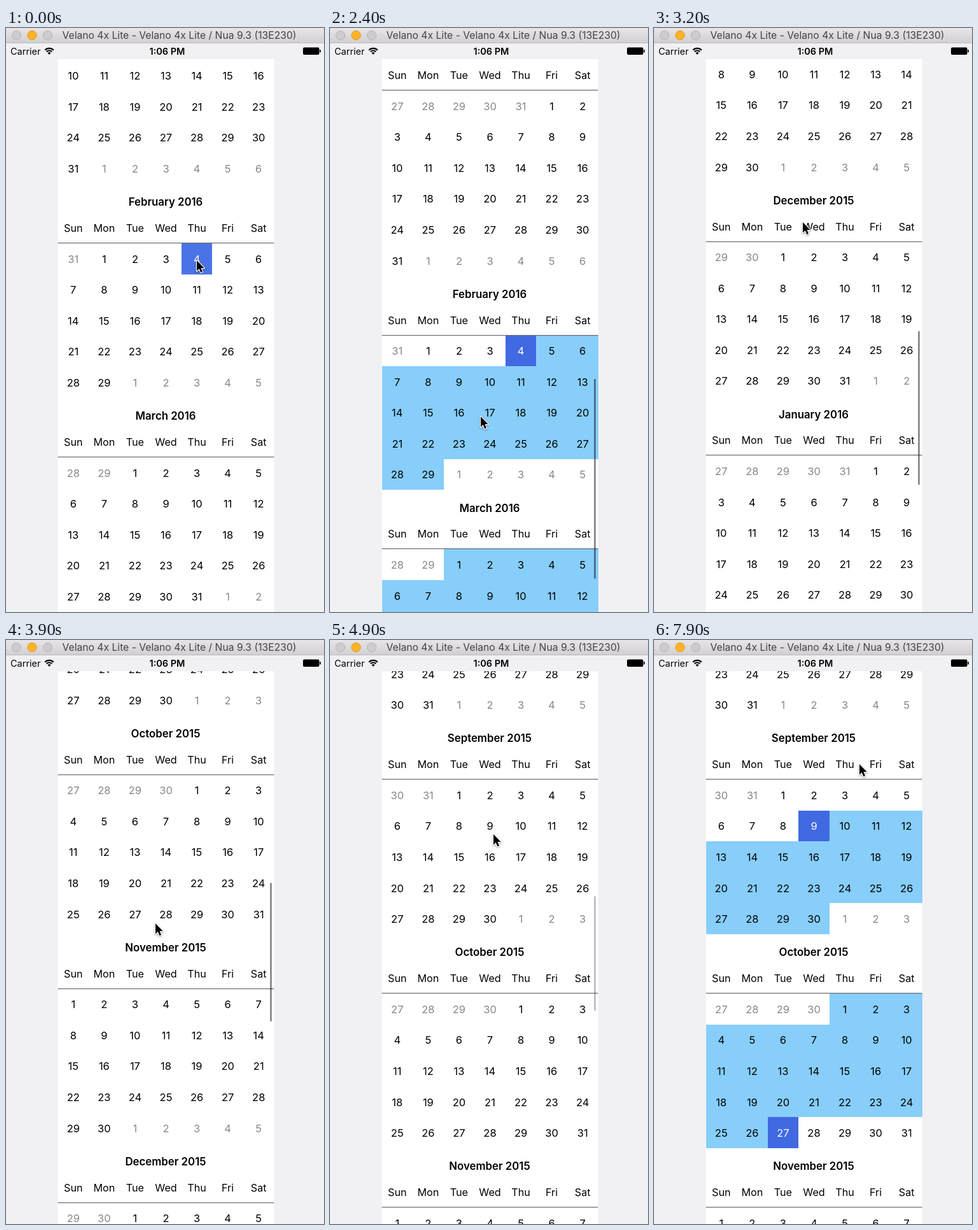
Animation, 500 px wide and 917 px high, one loop 8.1 s. Source, as an HTML page with a canvas:

```html
<!DOCTYPE html>
<html lang="en">
<head>
<meta charset="utf-8">
<title>Calendar range selection</title>
<style>
  html, body { margin: 0; width: 100%; height: 100%; overflow: hidden; background: #f1f0f3; }
  canvas { display: block; }
</style>
</head>
<body>
<canvas id="stage" width="500" height="917"></canvas>
<script>
const ctx = document.getElementById('stage').getContext('2d');
const W = 500, H = 917, LOOP = 8100, STEP = 100;
const LEFT = 81.5, CELL = 340 / 7, TOP = 49, HEAD = 93.1;
const FONT = 'Inter, Roboto, sans-serif';
const DAYS = ['Sun', 'Mon', 'Tue', 'Wed', 'Thu', 'Fri', 'Sat'];
const NAMES = ['January', 'February', 'March', 'April', 'May', 'June', 'July',
  'August', 'September', 'October', 'November', 'December'];
const ROYAL = '#4169e1', ROYAL_FRESH = '#4a73e6', SKY = '#87cefa';

// Months from April 2015 to March 2016; line = y of the rule below the weekdays
const months = [];
let y0 = 0;
for (let i = 3; i < 15; i++) {
  const year = 2015 + Math.floor(i / 12), month = i % 12;
  const first = new Date(year, month, 1).getDay();
  const count = new Date(year, month + 1, 0).getDate();
  const rows = Math.ceil((first + count) / 7);
  months.push({ year, month, first, count, rows, line: y0 + HEAD });
  y0 += HEAD + rows * CELL;
}
const febLine = months[10].line;
for (const m of months) m.line -= febLine;
const END = y0 - febLine;

// [time, distance scrolled]
const SCROLL = [[2000, 0], [2100, 18], [2200, 55], [2300, 97], [2400, 144.5], [2500, 210],
  [2600, 310], [2700, 400], [2900, 560], [3050, 655], [3200, 718], [3300, 750],
  [3400, 800], [3500, 865], [3600, 975], [3700, 1085], [3900, 1266], [4100, 1402],
  [4300, 1510], [4500, 1590], [4600, 1609.5]];

// [time, x, y] of the pointer tip
const POINTER = [[300, 300, 365], [1000, 103, 835], [1300, 103, 835], [2000, 237, 465],
  [2200, 237, 520], [2400, 237, 610], [2500, 237, 640], [3100, 234, 305], [3200, 234, 305],
  [3500, 235, 445], [3900, 235, 445], [4600, 257, 305], [4900, 257, 305], [5500, 252, 290],
  [5700, 252, 290], [6500, 192, 770], [7200, 192, 770], [7600, 323, 195]];

const BAR_ALPHA = [[2000, 0], [2100, 0.5], [4800, 0.5], [4900, 0.28], [5100, 0]];

const linear = k => k;
const smooth = k => k * k * (3 - 2 * k);

function track(keys, t, ease = linear) {
  if (t <= keys[0][0]) return keys[0].slice(1);
  for (let i = 1; i < keys.length; i++) {
    const a = keys[i - 1], b = keys[i];
    if (t <= b[0]) {
      const k = ease((t - a[0]) / (b[0] - a[0]));
      return a.slice(1).map((v, j) => v + (b[j + 1] - v) * k);
    }
  }
  return keys[keys.length - 1].slice(1);
}

const dayKey = (year, month, day) => year * 10000 + month * 100 + day;

function selectionAt(t) {
  if (t < 5700) {
    const from = dayKey(2016, 1, 4);
    return t < 1200
      ? { from, to: from, fresh: t < 100 ? from : 0 }
      : { from, to: dayKey(2016, 2, 20), fresh: 0 };
  }
  const from = dayKey(2015, 8, 9);
  return t < 6600
    ? { from, to: from, fresh: t < 5800 ? from : 0 }
    : { from, to: dayKey(2015, 9, 27), fresh: 0 };
}

function text(str, x, y, size, color = '#000', weight = 400, align = 'center') {
  ctx.font = `${weight} ${size}px ${FONT}`;
  ctx.textAlign = align;
  ctx.fillStyle = color;
  ctx.fillText(str, x, y);
}

function rect(x, y, w, h, color) {
  ctx.fillStyle = color;
  ctx.fillRect(x, y, w, h);
}

function pill(x, y, w, h, r, color) {
  ctx.fillStyle = color;
  ctx.beginPath();
  ctx.roundRect(x, y, w, h, r);
  ctx.fill();
}

function drawMonth(m, line, sel) {
  text(`${NAMES[m.month]} ${m.year}`, 251, line - 58.7, 16.8, '#000', 600);
  DAYS.forEach((d, c) => text(d, LEFT + (c + 0.5) * CELL, line - 18, 16.2));
  const before = new Date(m.year, m.month, 0).getDate();
  for (let i = 0; i < m.rows * 7; i++) {
    const col = i % 7, x = LEFT + col * CELL;
    const y = line + Math.floor(i / 7) * CELL;
    let day = i - m.first + 1, color = '#000';
    if (day < 1 || day > m.count) {
      day = day < 1 ? before + day : day - m.count;
      color = '#88888a';
    } else {
      const key = dayKey(m.year, m.month, day);
      if (key === sel.from || key === sel.to) {
        color = '#fff';
        const x1 = Math.round(x), y1 = Math.round(y);
        rect(x1, y1, Math.round(x + CELL) - x1, Math.round(y + CELL) - y1,
          key === sel.fresh ? ROYAL_FRESH : ROYAL);
      } else if (key > sel.from && key < sel.to) {
        const x1 = Math.round(x), y1 = Math.round(y);
        rect(x1, y1, Math.round(x + CELL) - x1, Math.round(y + CELL) - y1, SKY);
      }
    }
    text(day, x + CELL / 2, y + CELL / 2 + 6.4, 16.5, color);
  }
  rect(LEFT, Math.round(line) - 1, 340, 1.2, '#6c6c6e');
}

function firstVisible(origin) {
  return months.findIndex(m => origin + m.line + m.rows * CELL > TOP);
}

function drawBar(t, origin) {
  const alpha = track(BAR_ALPHA, t)[0];
  if (!alpha) return;
  // Four earlier months stay loaded, one step behind the scroll
  const seen = firstVisible(338 + track(SCROLL, t - STEP)[0]);
  const start = months[Math.max(0, seen - 4)].line - HEAD;
  const view = H - TOP, ratio = view / (END - start);
  const y = TOP + (TOP - origin - start) * ratio;
  pill(415.2, y, 2.6, view * ratio, 1.3, `rgba(0,0,0,${alpha})`);
}

function drawCalendar(t) {
  const origin = 338 + track(SCROLL, t)[0];
  const sel = selectionAt(t);
  ctx.save();
  ctx.beginPath();
  ctx.rect(0, TOP, W, H - TOP);
  ctx.clip();
  rect(LEFT, TOP, 340, H - TOP, '#fff');
  for (const m of months) {
    const line = origin + m.line;
    if (line - HEAD < H && line + m.rows * CELL > TOP) drawMonth(m, line, sel);
  }
  drawBar(t, origin);
  ctx.restore();
}

function drawWindow() {
  const g = ctx.createLinearGradient(0, 0, 0, 24);
  g.addColorStop(0, '#e7e5e7');
  g.addColorStop(1, '#d1cfd1');
  rect(0, 0, W, 24, g);
  rect(0, 23, W, 1, '#bab8ba');
  [['#cdcbcd', '#b7b5b7'], ['#fdb225', '#dd9a2c'], ['#cdcbcd', '#b7b5b7']].forEach(([fill, edge], i) => {
    ctx.beginPath();
    ctx.arc(16.5 + i * 24.5, 11.5, 7.2, 0, 7);
    ctx.fillStyle = fill;
    ctx.fill();
    ctx.strokeStyle = edge;
    ctx.lineWidth = 1;
    ctx.stroke();
  });
  text('Velano 4x Lite - Velano 4x Lite / Nua 9.3 (13E230)', 272.5, 17.3, 15.7, '#454345');
}

function drawStatus() {
  text('Carrier', 7, 42, 14.5, '#000', 400, 'left');
  text('1:06 PM', 253.5, 42, 14.5, '#000', 600);
  ctx.strokeStyle = '#000';
  ctx.lineWidth = 2.1;
  for (const r of [6, 9.6]) {
    ctx.beginPath();
    ctx.arc(68, 41.5, r, -Math.PI * 0.75, -Math.PI * 0.25);
    ctx.stroke();
  }
  ctx.fillStyle = '#000';
  ctx.beginPath();
  ctx.moveTo(68, 41.8);
  ctx.arc(68, 41.8, 3.6, -Math.PI * 0.75, -Math.PI * 0.25);
  ctx.fill();
  pill(467, 30.5, 25.5, 11.5, 2, '#000');
  pill(493.3, 34, 1.7, 4.5, 0.8, '#000');
}

const ARROW = new Path2D('M0 0V16.5L3.8 13L6.4 19.2L9 18.1L6.5 12.1H11.7Z');

function drawPointer(t) {
  const [x, y] = track(POINTER, t, smooth);
  ctx.save();
  ctx.translate(x, y);
  ctx.lineJoin = 'round';
  ctx.lineWidth = 2.4;
  ctx.strokeStyle = '#fff';
  ctx.shadowColor = 'rgba(0,0,0,.4)';
  ctx.shadowBlur = 3;
  ctx.shadowOffsetY = 1;
  ctx.stroke(ARROW);
  ctx.shadowColor = 'transparent';
  ctx.fillStyle = '#000';
  ctx.fill(ARROW);
  ctx.restore();
}

function frame(now) {
  const t = Math.min(7900, Math.floor((now % LOOP) / STEP) * STEP);
  rect(0, 0, W, H, '#f1f0f3');
  drawCalendar(t);
  drawWindow();
  drawStatus();
  drawPointer(t);
  requestAnimationFrame(frame);
}
requestAnimationFrame(frame);
</script>
</body>
</html>
```
